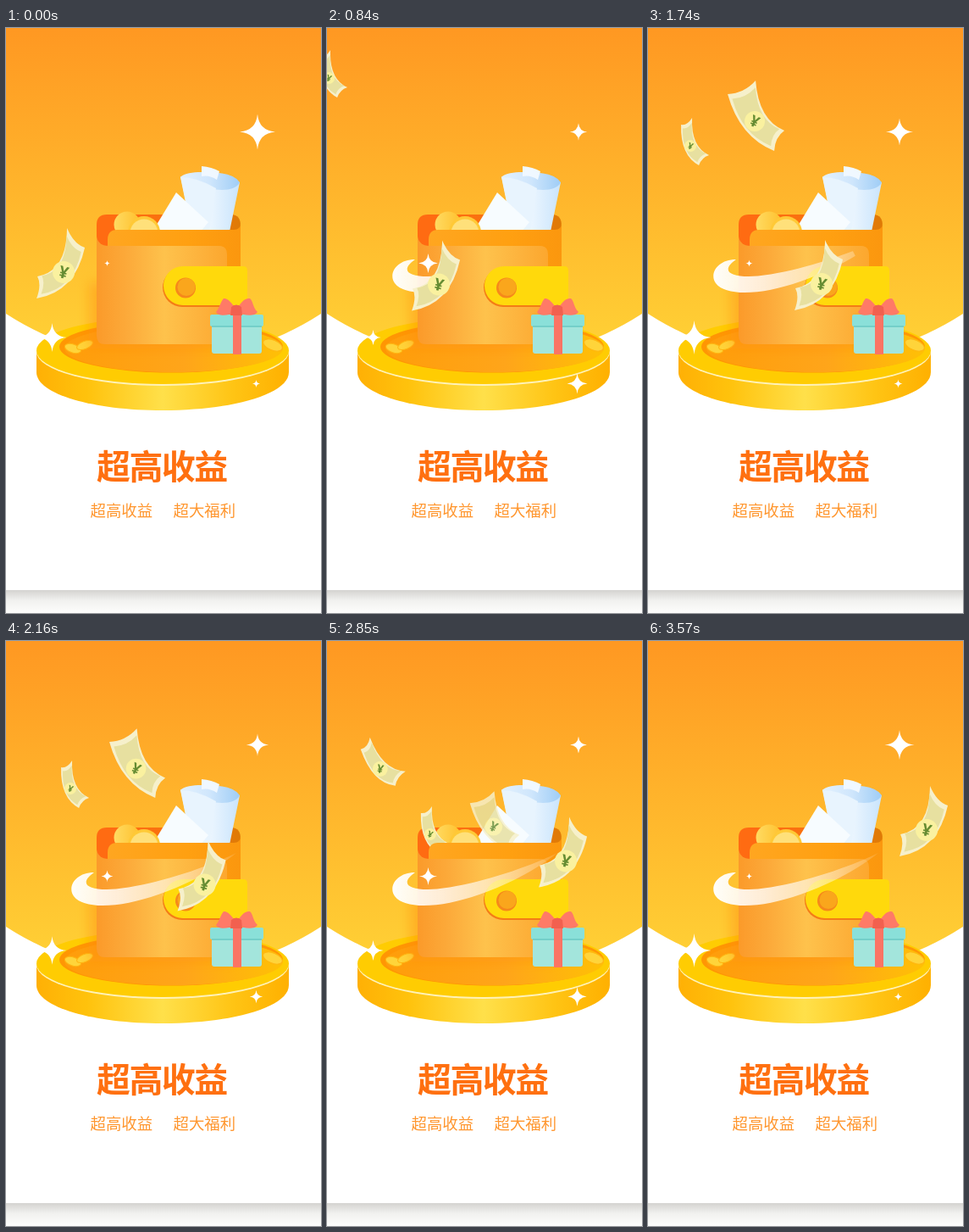
Animation, 372 px wide and 690 px high, one loop 3600 ms. Source, as an HTML page:

```html
<!DOCTYPE html>
<html lang="zh">
<head>
<meta charset="utf-8">
<style>
html, body { margin: 0; width: 100%; height: 100%; overflow: hidden; background: #fff; }
svg { display: block; width: 372px; height: 690px; }
text { font-family: "Noto Sans CJK SC", "Noto Sans CJK", "Noto Sans", sans-serif; }
.title { font-size: 40px; font-weight: 900; letter-spacing: -1.6px; fill: #ff7010; }
.sub { font-size: 18.4px; fill: #ff962e; }
.yen { font: bold 19px "Noto Sans", sans-serif; fill: #658c32; text-anchor: middle; }
</style>
</head>
<body>
<svg viewBox="0 0 372 690">
  <defs>
    <linearGradient id="sky" x2="0" y2="1"><stop stop-color="#ff9822"/><stop offset="1" stop-color="#ffd336"/></linearGradient>
    <linearGradient id="shade" x2="0" y2="1"><stop stop-color="#d4d3d0"/><stop offset=".45" stop-color="#f1f1ef"/><stop offset="1" stop-color="#fdfdfc"/></linearGradient>
    <linearGradient id="side"><stop stop-color="#ffb005"/><stop offset=".2" stop-color="#ffc20c"/><stop offset=".5" stop-color="#ffe04a"/><stop offset=".78" stop-color="#ffc414"/><stop offset="1" stop-color="#ffb000"/></linearGradient>
    <linearGradient id="well"><stop stop-color="#ff9d0a"/><stop offset=".55" stop-color="#ffa51a"/><stop offset="1" stop-color="#ffc005"/></linearGradient>
    <linearGradient id="back"><stop offset=".2" stop-color="#ff6b12"/><stop offset=".75" stop-color="#f27a0c"/><stop offset="1" stop-color="#de7a06"/></linearGradient>
    <linearGradient id="body"><stop stop-color="#ffa620"/><stop offset=".6" stop-color="#ffa011"/><stop offset="1" stop-color="#fb970e"/></linearGradient>
    <linearGradient id="panel"><stop stop-color="#fb9a2a"/><stop offset=".25" stop-color="#fcab3b"/><stop offset=".52" stop-color="#fec24c"/><stop offset=".8" stop-color="#fdb23c"/><stop offset="1" stop-color="#fca72e"/></linearGradient>
    <linearGradient id="coin"><stop stop-color="#ffdb62"/><stop offset="1" stop-color="#ffc02c"/></linearGradient>
    <linearGradient id="roll"><stop stop-color="#e2f1fe"/><stop offset=".4" stop-color="#f2f9ff"/><stop offset="1" stop-color="#c9e4fc"/></linearGradient>
    <linearGradient id="rim"><stop stop-color="#e3f1fe"/><stop offset=".5" stop-color="#cfe6fc"/><stop offset="1" stop-color="#9fcdf6"/></linearGradient>
    <linearGradient id="fade" gradientUnits="userSpaceOnUse" x1="77" x2="272"><stop stop-color="#fff" stop-opacity=".97"/><stop offset=".3" stop-color="#fff" stop-opacity=".8"/><stop offset=".65" stop-color="#fff" stop-opacity=".5"/><stop offset="1" stop-color="#fff" stop-opacity=".12"/></linearGradient>
    <filter id="soft" x="-30%" y="-30%" width="160%" height="160%"><feGaussianBlur stdDeviation="7"/></filter>
    <clipPath id="inside"><path d="M100 100H290V240H100Z"/></clipPath>
    <clipPath id="dome"><rect width="372" height="400"/></clipPath>
    <mask id="reveal" maskUnits="userSpaceOnUse" x="50" y="230" width="250" height="110">
      <path id="trail" d="M107 273C73 278 78 303 112 302C165 302 230 276 276 246" fill="none" stroke="#fff" stroke-width="28" pathLength="1" stroke-dasharray="1 2"/>
    </mask>
  </defs>

  <rect width="372" height="663" fill="#fff"/>
  <rect y="663" width="372" height="27" fill="url(#shade)"/>
  <g clip-path="url(#dome)">
    <path d="M0 0H372V337A342 342 0 0 1 0 337Z" fill="url(#sky)"/>
  </g>

  <g id="plate">
    <path d="M36 381V406C36 432 103 451 185 451S334 432 334 406V381Z" fill="url(#side)"/>
    <ellipse cx="185" cy="382" rx="149" ry="40" fill="#fff2b8"/>
    <ellipse cx="185" cy="380.5" rx="149" ry="39.5" fill="#ffcc02"/>
    <ellipse cx="195" cy="376" rx="132" ry="30.5" fill="#ff9604"/>
    <ellipse cx="198" cy="378" rx="129" ry="28" fill="url(#well)"/>
    <g fill="#ffd43a" stroke="#ffb512">
      <ellipse cx="79" cy="378" rx="10" ry="5" transform="rotate(18 79 378)"/>
      <ellipse cx="93" cy="374" rx="10" ry="4.5" transform="rotate(-22 93 374)"/>
      <ellipse cx="315" cy="374" rx="12" ry="6" transform="rotate(22 315 374)"/>
    </g>
  </g>

  <path d="M98 300H270V378H98Z" fill="#ff8a10" opacity=".42" filter="url(#soft)"/>
  <path d="M107 360V232Q107 220 119 220H267Q277 221 277 233V360Z" fill="url(#back)"/>

  <g clip-path="url(#inside)">
    <path d="M206 175Q225 186 276 182L264 240H220Z" fill="url(#roll)"/>
    <path d="M206 176C214 168 236 170 251 171Q270 173 276 182C272 191 256 193 240 189Q218 184 206 176Z" fill="url(#rim)"/>
    <path d="M231 163Q243 164 252 169L249 179Q240 173 231 175Z" fill="#f0f8ff"/>
    <path d="M206 176Q226 176 248 189L240 240H219Z" fill="#e8f4fe"/>
    <path d="M201 194L239 229L230 240H173Z" fill="#f7fcff"/>
    <circle cx="143" cy="232" r="15.5" fill="url(#coin)"/>
    <circle cx="163" cy="241" r="19" fill="#ffc936"/>
    <circle cx="163" cy="242" r="16.5" fill="#ffe07a"/>
  </g>
  <g id="falling"></g>

  <path d="M120 250Q120 238 131 238H269Q277 238 277 230V363Q277 373 267 373H120Z" fill="url(#body)"/>
  <path d="M107 246Q109 257 121 257H252Q261 257 261 267V373H117Q107 373 107 363Z" fill="url(#panel)"/>
  <path d="M285 285V324Q285 329 280 329H208A23 23 0 0 1 208 283Z" fill="#f47c16"/>
  <path d="M208 281H280Q285 281 285 286V322Q285 327 280 327H209A23 23 0 0 1 209 281Z" fill="#ffd90c"/>
  <circle cx="212" cy="306.500" r="12" fill="#f6881b"/>
  <circle cx="213" cy="305.500" r="10.500" fill="#faa61c"/>

  <path d="M243 351H302V381Q302 384 299 384H246Q243 384 243 381Z" fill="#a3e5dc"/>
  <rect x="241" y="338" width="63" height="14" rx="2" fill="#8ae0d9"/>
  <path d="M243 351H302V353H243Z" fill="#74cfc9"/>
  <rect x="268" y="338" width="10" height="47" fill="#fb7464"/>
  <path d="M271 331C267 324 261 318 257 319C253 323 253 329 248 335C251 341 263 339 272 335C281 339 293 341 297 335C291 329 292 322 288 319C282 318 277 324 273 331Z" fill="#ff7a67"/>
  <path d="M266 329Q272 324 278 329L279 339H265Z" fill="#f2604f"/>

  <path mask="url(#reveal)" fill="url(#fade)" d="M104 273C82 273 72 290 80 301C92 317 135 315 180 299C215 287 250 268 272 250C235 268 175 288 130 292.500C98 295 84 287 104 273Z"/>
  <g id="front"></g>
  <g id="stars" fill="#fff"></g>

  <text class="title" x="107" y="532">超高收益</text>
  <text class="sub" x="99.500" y="575.500">超高收益</text>
  <text class="sub" x="197.500" y="575.500">超大福利</text>
</svg>
<script>
const LOOP = 3600;
const $ = id => document.getElementById(id);

function add(parent, tag, attrs) {
  const el = document.createElementNS("http://www.w3.org/2000/svg", tag);
  for (const k in attrs) el.setAttribute(k, attrs[k]);
  return parent.appendChild(el);
}

// Linear interpolation over rows of [time, ...values].
function at(keys, t) {
  if (t <= keys[0][0]) return keys[0].slice(1);
  const i = keys.findIndex(k => k[0] > t);
  if (i < 0) return keys[keys.length - 1].slice(1);
  const a = keys[i - 1], b = keys[i], p = (t - a[0]) / (b[0] - a[0]);
  return a.slice(1).map((v, n) => v + (b[n + 1] - v) * p);
}

// A curved note from four corners; its middle line bends through the origin.
function notePath([a, b, c, d]) {
  const bend = [0, 1].map(n => -(a[n] + b[n] + c[n] + d[n]) / 2);
  const arc = (p, q) => [0, 1].map(n => (p[n] + q[n]) / 2 + bend[n]);
  const dent = (p, q) => [0, 1].map(n => (p[n] + q[n]) * 0.41);
  return `M${a}Q${dent(a, b)} ${b}Q${arc(b, c)} ${c}Q${dent(c, d)} ${d}Q${arc(d, a)} ${a}Z`;
}

function makeNote({ layer, corners, coin, turn, keys }) {
  const g = add($(layer), "g", {});
  const d = notePath(corners);
  add(g, "path", { d, fill: "#f6f0cb" });
  add(g, "path", { d, fill: "#e7e0a0", transform: "scale(.83)" });
  add(g, "circle", { r: coin, fill: "#faf19f" });
  const yen = add(g, "text", { class: "yen", y: 6.8, transform: `rotate(${turn}) scale(${coin / 12.5})` });
  yen.textContent = "¥";
  return t => {
    const [x, y, size = 1, alpha = 1] = at(keys, t);
    g.setAttribute("transform", `translate(${x} ${y}) scale(${size})`);
    g.setAttribute("opacity", alpha);
  };
}

const notes = [
  { layer: "falling", coin: 7, turn: 20,
    corners: [[2, -33], [-11, -25], [10, 23], [22, 11]],
    keys: [[0, -42, -12], [480, -16, 27], [1200, 20, 91], [1740, 50, 139], [2580, 102, 209], [3180, 146, 251], [3500, 168, 280]] },
  { layer: "falling", coin: 12, turn: 25,
    corners: [[1, -48], [-32, -32], [23, 35], [35, 11]],
    keys: [[900, 48, -60, 1, 1], [1200, 76, 1, 1, 1], [1740, 126, 110, 1, 1], [2580, 181, 191, .97, 1],
      [2800, 194, 214, .9, .9], [3180, 214, 252, .7, .4], [3400, 220, 275, .6, 0]] },
  { layer: "falling", coin: 9, turn: 12,
    corners: [[-12, -37], [-23, -23], [18, 20], [30, 3]],
    keys: [[2100, -42, 112, 1, 1], [2580, 23, 130, 1, 1], [3180, 111, 176, 1, 1], [3300, 127, 190, .95, 1], [3500, 150, 215, .8, 0]] },
  { layer: "front", coin: 13, turn: 15,
    corners: [[4, -52], [25, -29], [-32, 31], [-31, 5]],
    keys: [[0, 68, 288], [480, 104, 295], [1200, 160, 310], [1740, 205, 302], [2580, 264, 273], [3180, 304, 243], [3570, 329, 223], [3600, 331, 221]] }
].map(makeNote);

// Small stars pulse evenly, twice per loop.
const pulse = (min, max) => t => min + (max - min) * (1 - Math.abs(1 - (t % 1800) / 900));
const steps = keys => t => at(keys, t)[0];

const stars = [
  [297, 122.5, steps([[0, 21], [480, 15], [900, 9.5], [1200, 11.5], [1740, 16], [1830, 17], [2220, 12.5], [2580, 9], [2700, 8.5], [3180, 13], [3570, 17.5], [3600, 18]])],
  [54.5, 365, steps([[0, 17], [480, 12.5], [900, 8.5], [1200, 12], [1740, 20], [1830, 21], [2580, 11.5], [2700, 10.5], [3180, 15.5], [3570, 20], [3600, 20.5]])],
  [295.5, 419.5, pulse(4.5, 12.5)],
  [119.5, 277.5, pulse(3.5, 12)]
].map(([x, y, radius]) => {
  const el = add($("stars"), "path", { d: "M0-1Q.08-.08 1 0Q.08.08 0 1Q-.08.08-1 0Q-.08-.08 0-1Z" });
  return t => el.setAttribute("transform", `translate(${x} ${y}) scale(${radius(t)})`);
});

// The stars lie under the leading note.
$("front").before($("stars"));

const trailKeys = [[0, 0], [250, 0], [480, .2], [1200, .46], [1740, .84], [2200, 1]];
function drawTrail(t) {
  const [shown] = at(trailKeys, t);
  $("trail").setAttribute("stroke-dasharray", `${shown} 2`);
  $("trail").setAttribute("visibility", shown ? "visible" : "hidden");
}

const parts = [...notes, ...stars, drawTrail];
const start = performance.now();
function frame(now) {
  const t = Math.max(0, now - start) % LOOP;
  parts.forEach(draw => draw(t));
  requestAnimationFrame(frame);
}
frame(start);
</script>
</body>
</html>
```
